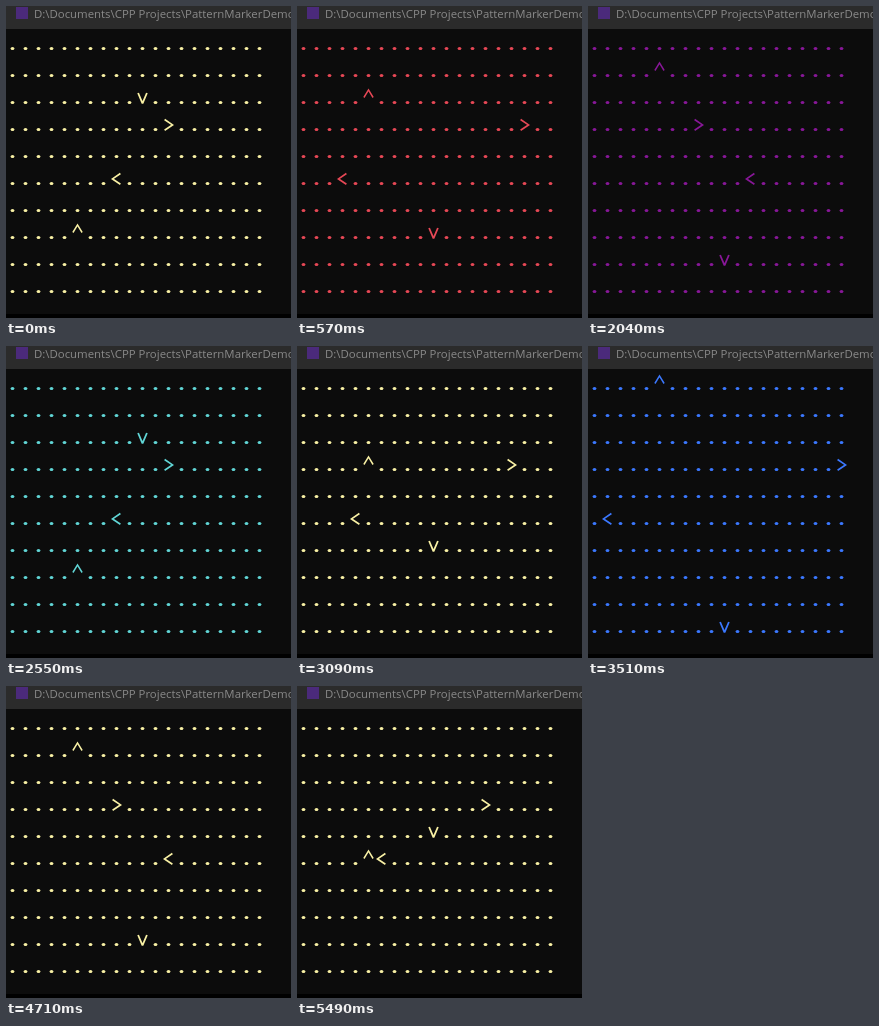
Animation, 285 px wide and 312 px high, one loop 5.55 s. Source, as an HTML page with a canvas:

```html
<!DOCTYPE html>
<html lang="en">
<head>
<meta charset="utf-8">
<title>Console grid</title>
<style>
  html, body { margin: 0; width: 100%; height: 100%; overflow: hidden; background: #0c0c0c; }
  canvas { position: absolute; left: 0; top: 0; display: block; }
  .bar { position: absolute; left: 0; top: 0; width: 285px; height: 23px; overflow: hidden; background: #2b2b2b; }
  .icon { position: absolute; left: 10px; top: 1px; width: 12px; height: 12px; background: #4b2a7b; }
  .path { position: absolute; left: 28px; top: 0; white-space: pre; color: #8a8a8a;
          font: 11.4px/15px "Open Sans", "Noto Sans", sans-serif; }
</style>
</head>
<body>
<canvas id="stage" width="285" height="312"></canvas>
<div class="bar">
  <div class="icon"></div>
  <div class="path">D:\Documents\CPP Projects\PatternMarkerDemo</div>
</div>
<script>
const ctx = document.getElementById('stage').getContext('2d');
const LOOP = 5550, COLS = 20, ROWS = 10;
const COLORS = ['#f9f1a5', '#16c60c', '#61d6d6', '#3b78ff', '#881798', '#e74856'];

// Strokes relative to the centre of the dot in the same cell.
const GLYPHS = {
  'v': { width: 1.8, points: [-4.4, -9.5, 0, 0.9, 4.4, -9.5] },
  '^': { width: 1.5, points: [-4.6, -5, 0, -12.6, 4.6, -5] },
  '>': { width: 1.7, points: [-3.9, -10, 4, -4.6, -3.9, 0.8] },
  '<': { width: 1.7, points: [3.9, -10, -4, -4.6, 3.9, 0.8] }
};

// Steps come in runs 120 ms apart, with 30 ms extra between runs.
const runs = [1, 3, 2, 2, 2, 2, 3, 2, 3, 2, 2, 2, 3, 2, 2, 2, 2, 3, 2];
const starts = [0];
let next = 30;
for (const count of runs) {
  for (let i = 0; i < count; i++, next += 120) starts.push(next);
  next += 30;
}

const wrap = (n, size) => ((n % size) + size) % size;

function drawDot(x, y) {
  ctx.beginPath();
  ctx.ellipse(x, y, 1.9, 1.55, 0, 0, Math.PI * 2);
  ctx.fill();
}

function drawGlyph(name, x, y) {
  const { width, points: p } = GLYPHS[name];
  ctx.lineWidth = width;
  ctx.lineJoin = name === 'v' ? 'bevel' : 'miter';
  ctx.beginPath();
  ctx.moveTo(x + p[0], y + p[1]);
  ctx.lineTo(x + p[2], y + p[3]);
  ctx.lineTo(x + p[4], y + p[5]);
  ctx.stroke();
}

function draw(step) {
  const cells = {};
  const put = (name, col, row) => { cells[wrap(row, ROWS) * COLS + wrap(col, COLS)] = name; };
  put('v', 10, 2 + step);
  put('^', 5, 7 - step);
  put('>', 12 + step, 3);
  put('<', 8 - step, 5);

  ctx.fillStyle = '#0c0c0c';
  ctx.fillRect(0, 0, 285, 312);
  ctx.fillStyle = '#000';
  ctx.fillRect(0, 308, 285, 4);

  ctx.fillStyle = ctx.strokeStyle = COLORS[step % COLORS.length];
  for (let i = 0; i < COLS * ROWS; i++) {
    const x = 6.5 + 13 * (i % COLS);
    const y = 42.5 + 27 * Math.floor(i / COLS);
    if (cells[i]) drawGlyph(cells[i], x, y);
    else drawDot(x, y);
  }
}

const origin = performance.now();
function tick() {
  const t = (performance.now() - origin) % LOOP;
  let step = starts.length - 1;
  while (starts[step] > t) step--;
  draw(step);
  requestAnimationFrame(tick);
}
tick();
</script>
</body>
</html>
```
